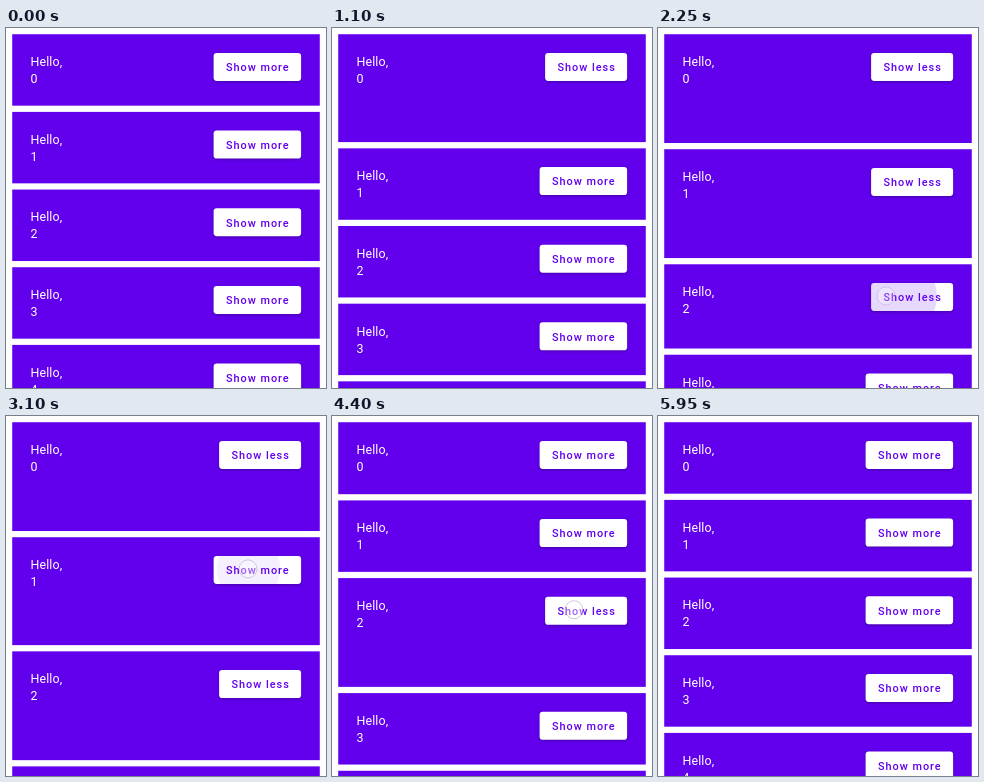
These frames come from a looping animation (320 by 360 pixels, 6000 ms). An HTML page with a canvas:

```html
<!DOCTYPE html>
<html lang="en">
<head>
<meta charset="utf-8">
<title>Expanding list</title>
<style>
  html, body { margin: 0; width: 100%; height: 100%; overflow: hidden; background: #fff; }
  canvas { display: block; }
</style>
</head>
<body>
<canvas width="320" height="360"></canvas>
<script>
const ctx = document.querySelector('canvas').getContext('2d');
const LOOP = 6000;
const DP = 320 / 411.43;
const PURPLE = '#6200ee';
const FONT = 'Roboto, Arial, sans-serif';
const GAP = 8 * DP, PAD = 24 * DP, EXTRA = 48 * DP;
const CARD_H = 71.45, CARD_W = 320 - 2 * GAP;
const BTN_RIGHT = 320 - GAP - PAD, BTN_H = 36 * DP;

// Each tap toggles one card; time is the release, x the finger position.
const taps = [
  { time: 555, card: 0, x: 224 },
  { time: 1355, card: 1, x: 224 },
  { time: 2180, card: 2, x: 228 },
  { time: 3085, card: 1, x: 242 },
  { time: 3800, card: 0, x: 242 },
  { time: 4500, card: 2, x: 242 }
];

const clamp = v => Math.min(1, Math.max(0, v));
const mix = (a, b, k) => a + (b - a) * k;
const easeOut = k => 1 - (1 - k) ** 3;

// Step response of a spring with stiffness 200 and damping ratio 0.5.
function spring(ms) {
  if (ms <= 0) return 0;
  const s = ms / 1000, decay = Math.sqrt(200) / 2, w = decay * Math.sqrt(3);
  return 1 - Math.exp(-decay * s) * (Math.cos(w * s) + decay / w * Math.sin(w * s));
}

function cardState(card, t) {
  let open = false, amount = 0;
  for (const tap of taps) {
    if (tap.card !== card) continue;
    const dir = open ? -1 : 1;
    amount += dir * spring(t - tap.time);
    if (t >= tap.time) open = !open;
    else break;
  }
  return { open, extra: Math.max(0, amount) * EXTRA };
}

function text(str, x, y, size, weight, color, spacing) {
  ctx.font = `${weight} ${size * DP}px ${FONT}`;
  ctx.letterSpacing = spacing * DP + 'px';
  ctx.fillStyle = color;
  ctx.fillText(str, x, y);
}

function disc(x, y, r, color) {
  ctx.fillStyle = color;
  ctx.beginPath();
  ctx.arc(x, y, r, 0, 7);
  ctx.fill();
}

function ripple(tap, age, left, width, top) {
  if (age < 0 || age > 375) return;
  const k = clamp(age / 225);
  const alpha = 0.15 * clamp((age + 15) / 75) * clamp((375 - age) / 150);
  const cy = top + BTN_H / 2;
  const r = mix(width * 0.3, Math.hypot(width, BTN_H) / 2 + 10 * DP, easeOut(k));
  disc(mix(tap.x, left + width / 2, k), mix(cy - 1, cy, k), r, `rgba(98,0,238,${alpha})`);
}

function finger(tap, age, top) {
  const alpha = clamp((age + 120) / 20) * clamp((200 - age) / 200);
  if (!alpha) return;
  ctx.globalAlpha = alpha;
  disc(tap.x, top + BTN_H / 2 - 1, 9, 'rgba(255,255,255,.4)');
  ctx.strokeStyle = 'rgba(160,140,190,.5)';
  ctx.lineWidth = 1;
  ctx.stroke();
  ctx.globalAlpha = 1;
}

function button(card, open, y, t) {
  const width = open ? 82 : 87.5, left = BTN_RIGHT - width, top = y + PAD;
  const mine = taps.filter(tap => tap.card === card);
  ctx.save();
  ctx.beginPath();
  ctx.roundRect(left, top, width, BTN_H, 4 * DP);
  ctx.shadowColor = 'rgba(0,0,0,.3)';
  ctx.shadowBlur = 3;
  ctx.shadowOffsetY = 1;
  ctx.fillStyle = '#fff';
  ctx.fill();
  ctx.shadowColor = 'transparent';
  ctx.clip();
  text(open ? 'Show less' : 'Show more', left + 16 * DP, top + 18.3, 14, 500, PURPLE, 1.25);
  for (const tap of mine) ripple(tap, t - tap.time, left, width, top);
  ctx.restore();
  for (const tap of mine) finger(tap, t - tap.time, top);
}

function draw(t) {
  ctx.fillStyle = '#fff';
  ctx.fillRect(0, 0, 320, 360);
  let y = GAP;
  for (let card = 0; card < 5; card++) {
    const { open, extra } = cardState(card, t);
    ctx.fillStyle = PURPLE;
    ctx.fillRect(GAP, y, CARD_W, CARD_H + extra);
    text('Hello,', GAP + PAD - 0.4, y + 31.9, 16, 400, '#fff', 0.15);
    text(String(card), GAP + PAD - 0.4, y + 48.9, 16, 400, '#fff', 0.15);
    button(card, open, y, t);
    y += CARD_H + extra + GAP;
  }
}

const start = performance.now();
function frame() {
  draw((performance.now() - start) % LOOP);
  requestAnimationFrame(frame);
}
frame();
</script>
</body>
</html>
```
